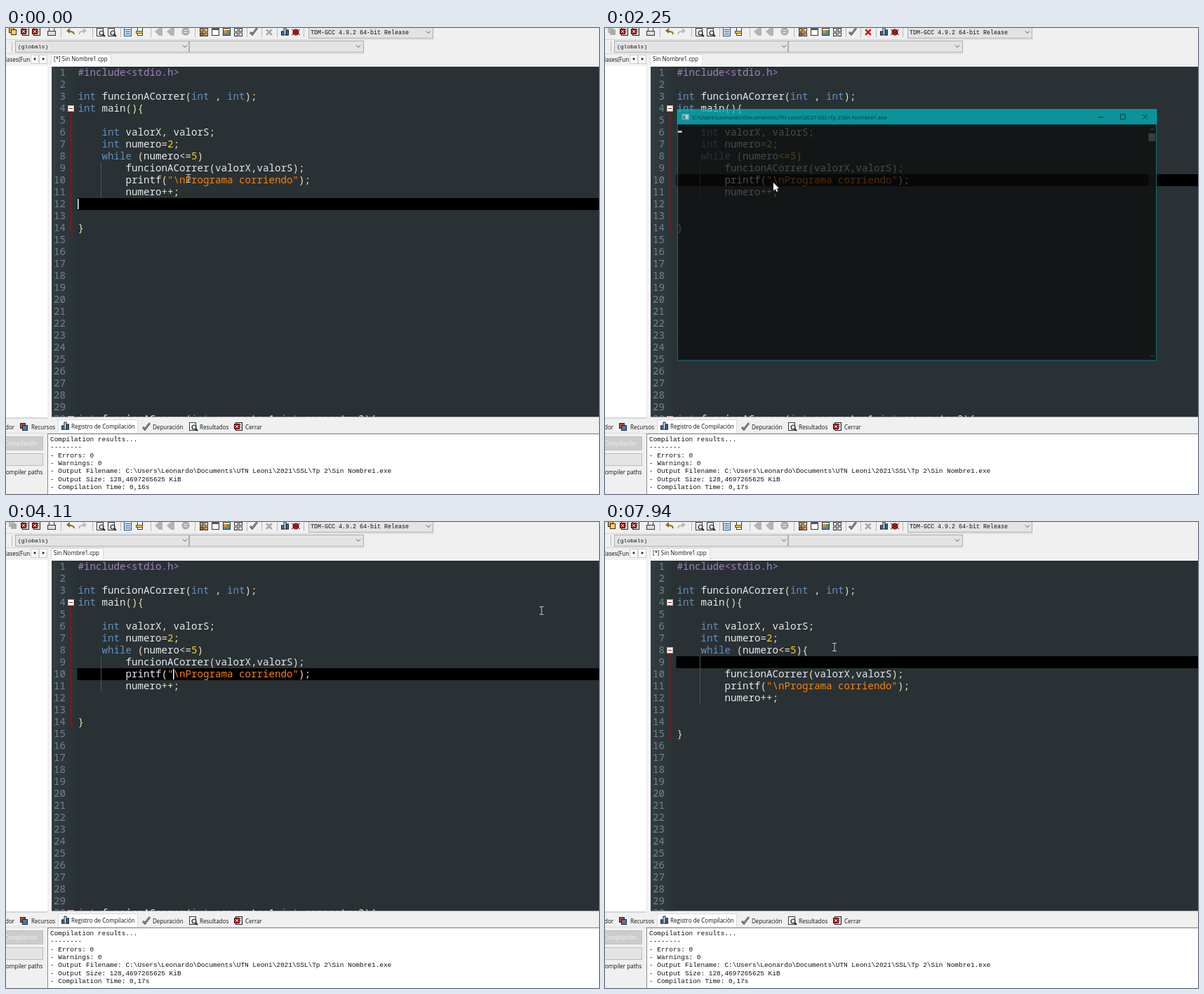
An HTML page with a canvas for the animation above (8 s loop, 845 by 663 pixels).

```html
<!DOCTYPE html>
<html lang="es">
<head>
<meta charset="utf-8">
<style>
html, body { margin: 0; width: 100%; height: 100%; overflow: hidden; background: #f0f0f0; }
canvas { display: block; }
</style>
</head>
<body>
<canvas id="stage" width="845" height="663"></canvas>
<script>
const c = document.getElementById('stage').getContext('2d');
const LOOP = 8000, X0 = 102.5, CW = 8.5, ROW = 17, TOP = 55, END = 553.5;
const UI = '8.05px "Open Sans", sans-serif';
const MONO = '"Liberation Mono", monospace';
const CODE = '14.17px "Noto Sans Mono", monospace';
const PATH = 'C:\\Users\\Leonardo\\Documents\\UTN Leoni\\2021\\SSL\\Tp 2\\Sin Nombre1.exe';

const HEAD = ['#include<stdio.h>', '', 'int funcionACorrer(int , int);', 'int main(){', '',
  '    int valorX, valorS;', '    int numero=2;'];
const BODY = ['        funcionACorrer(valorX,valorS);',
  '        printf("\\nPrograma corriendo");', '        numero++;', '', '', '}'];
const COLORS = ['#fb8007', '#a082bd', '#6390bd', '#ffcd22', '#e8e2b7', '#e8eaec'];
const TOKENS = /("[^"]*")|(#.*)|\b(int|while)\b|\b(\d+)|([^\w\s"]+)|(\w+|\s+)/g;

// Time, row, column, visible
const CARET = [[0, 12, 0, 1], [1090, 10, 16, 1], [2180, 10, 16, 0], [3970, 10, 16, 1],
  [4500, 8, 22, 1], [4800, 8, 22, 0], [5000, 8, 22, 1], [5200, 8, 21, 1], [5300, 8, 22, 1],
  [5730, 8, 22, 0], [5930, 9, 5, 1], [6210, 9, 5, 0], [6470, 9, 5, 1], [6670, 9, 5, 0],
  [6870, 10, 22, 1], [7070, 10, 22, 0], [7270, 9, 5, 1], [7470, 9, 5, 0],
  [7670, 9, 4, 1], [7940, 9, 4, 0]];
// Time, x, y
const MOUSE = [[0, 260, 214], [690, 260, 214], [1050, 241, 219], [2180, 240, 220], [2300, 240, 220],
  [2800, 261, 169], [3000, 261, 169], [3760, 752, 122], [3830, 766, 125], [4110, 764, 126],
  [4600, 331, 177], [4800, 327, 178], [LOOP, 327, 178]];

const clamp = v => Math.max(0, Math.min(1, v));
const rowTop = n => TOP + (n - 1) * ROW;

function box(x, y, w, h, fill, edge) {
  if (fill) { c.fillStyle = fill; c.fillRect(x, y, w, h); }
  if (edge) { c.strokeStyle = edge; c.lineWidth = 1; c.strokeRect(x + .5, y + .5, w - 1, h - 1); }
}
function text(s, x, y, font = UI, color = '#111') {
  c.font = font;
  c.fillStyle = color;
  c.fillText(s, x, y);
}
function line(color, width, ...p) {
  c.strokeStyle = color;
  c.lineWidth = width;
  c.beginPath();
  for (let i = 0; i < p.length; i += 2) c.lineTo(p[i], p[i + 1]);
  c.stroke();
}
function poly(fill, ...p) {
  c.fillStyle = fill;
  c.beginPath();
  for (let i = 0; i < p.length; i += 2) c.lineTo(p[i], p[i + 1]);
  c.fill();
}
function ring(x, y, r, color, fill) {
  c.beginPath();
  c.arc(x, y, r, 0, 7);
  if (fill) { c.fillStyle = fill; c.fill(); }
  c.strokeStyle = color;
  c.lineWidth = 1.2;
  c.stroke();
}

// Icons, placed by their centre
const cross = (x, y, r, color, w) => {
  line(color, w, x - r, y - r, x + r, y + r);
  line(color, w, x - r, y + r, x + r, y - r);
};
const tick = (x, y) => {
  line('#222', 2.6, x - 5, y + 1, x - 2, y + 4, x + 5, y - 5);
  line('#dfe8f5', 1, x - 5, y + 1, x - 2, y + 4, x + 5, y - 5);
};
const chart = (x, y) => [[-5, 6], [-1.5, 11], [2, 8]].forEach(([dx, h], i) =>
  box(x + dx, y + 5.5 - h, 4, h, ['#3a6ea5', '#d8e4f2', '#3a6ea5'][i], '#1a2530'));
const find = (x, y) => {
  box(x - 6, y - 6, 10, 12, '#fff', '#333');
  ring(x + 1, y + 1, 3, '#222', '#cfe2ee');
  line('#222', 2, x + 3, y + 3, x + 6, y + 6);
};
const closeDoc = (x, y) => {
  box(x - 4, y - 6, 10, 12, '#e4e4e4', '#222');
  line('#555', 1, x + 2, y - 2.5, x + 4, y - 2.5);
  line('#555', 1, x + 2, y + .5, x + 4, y + .5);
  box(x - 6, y - 4, 8, 8, '#b01818', '#5a0c0c');
  cross(x - 2, y, 1.8, '#fff', 1);
};
const grid = (x, y, colors) => colors.forEach((color, i) =>
  box(x - 6 + i % 2 * 6.5, y - 6 + (i >> 1) * 6.5, 5.5, 5.5, color, '#333'));
const stack = (x, y, a, b, edge) => {
  box(x - 6, y - 6, 8, 8, a, edge);
  box(x - 3, y - 3, 8, 8, b, edge);
};
const chevron = (x, y, color = '#555') => line(color, 1, x - 3, y - 1.5, x, y + 1.5, x + 3, y - 1.5);

function toolbar(saved, running) {
  box(0, 0, 845, 54, '#f0f0f0');
  line('#d4d4d4', 1, 0, 16.5, 610, 16.5);
  line('#d4d4d4', 1, 0, 36.5, 510, 36.5);
  for (const x of [78, 123, 163, 206, 269, 343, 364, 386, 424]) line('#b8b8b8', 1, x + .5, 0, x + .5, 13);
  if (saved) stack(10, 5, '#bdbdbd', '#a9a9a9', '#b0b0b0');
  else stack(10, 5, '#e5a83b', '#f5d36b', '#3b2a10');
  closeDoc(27, 5);
  closeDoc(43, 5);
  box(59, 4, 12, 7, '#ddd', '#333');
  box(61, -3, 8, 8, '#fff', '#333');
  line('#8a6d1c', 2, 97, 9, 96, 6, 89, 4);
  poly('#8a6d1c', 86, 4, 91, 0, 91, 8);
  line('#bbb', 2, 104, 9, 105, 6, 111, 4);
  poly('#bbb', 115, 4, 110, 0, 110, 8);
  find(135, 6);
  find(151, 6);
  box(168, -1, 11, 13, '#dbe9f8', '#24517c');
  for (const y of [2.5, 5.5, 8.5]) line('#24517c', 1, 170, y, 177, y);
  box(187, -1, 8, 12, '#fff', '#333');
  box(185, 4, 10, 4, '#f0c840', '#5d4a10');
  poly('#b4b4b4', 212, 5, 218, 0, 223, 0, 223, 11, 218, 11);
  poly('#b4b4b4', 229, 5, 235, 0, 240, 0, 240, 11, 235, 11);
  ring(256, 5, 5, '#aaa', '#aaa');
  box(253, 3, 6, 1, '#eee');
  box(253, 6, 6, 1, '#eee');
  grid(282, 6, ['#e6a23c', '#f6dc9c', '#b8542c', '#e6a23c']);
  box(293, 0, 11, 11, '#fff', '#333');
  box(293, 0, 11, 3, '#555');
  box(309, 0, 11, 11, '#fff', '#333');
  box(310, 3, 5, 4, '#e08a2c');
  box(315, 3, 4, 4, '#4d9b4a');
  box(310, 7, 9, 3, '#5a86c0');
  grid(331, 6, ['#fff', '#ddd', '#ddd', '#fff']);
  tick(353, 5);
  cross(375, 6, 3.8, running ? '#d90d0d' : '#a6a6a6', 2.6);
  chart(397, 5);
  ring(413, 6, 4, '#5a0d0d', '#c62020');
  line('#5a0d0d', 1, 407, 2, 419, 10);
  line('#5a0d0d', 1, 407, 10, 419, 2);
  box(431, -3, 178, 18, '#e3e3e3', '#adadad');
  text('TDM-GCC 4.9.2 64-bit Release', 434, 9, '8.33px ' + MONO);
  chevron(602, 6);
  line('#b8b8b8', 1, 8.5, 19, 8.5, 34);
  box(13, 18, 248, 17, '#e3e3e3', '#adadad');
  box(261, 18, 249, 17, '#e3e3e3', '#adadad');
  text('(globals)', 17, 29, '8px ' + MONO);
  chevron(255, 26);
  chevron(502, 26);

  text('lases(Fun', -1, 48);
  box(35, 38, 12, 13, '#fafafa', '#d0d0d0');
  box(47, 38, 12, 13, '#fafafa', '#d0d0d0');
  poly('#111', 39, 44, 42, 42, 42, 46);
  poly('#111', 55, 44, 52, 42, 52, 46);
  box(64, 37, saved ? 75 : 86, 18, '#fff', '#dcdcdc');
  text((saved ? '' : '[*] ') + 'Sin Nombre1.cpp', 68, 47);
  box(62, 53, 783, 2, '#fff');
}

function bottom(secs) {
  box(0, END, 845, 663 - END, '#f0f0f0');
  box(0, 554, 59, 2, '#d8d8d8');
  line('#dcdcdc', 1, 0, 576.5, 845, 576.5);
  box(74, 557, 114, 20, '#fff', '#dcdcdc');
  text('dor', -1, 571);
  stack(26, 568, '#c8442c', '#4a78b4', '#222');
  text('Recursos', 36, 571);
  chart(84, 566);
  text('Registro de Compilación', 93, 570);
  tick(200, 567);
  text('Depuración', 209, 571);
  find(267, 567);
  text('Resultados', 276, 571);
  closeDoc(331, 567);
  text('Cerrar', 341, 571);
  box(-2, 581, 55, 20, '#cccccc', '#bfbfbf');
  text('Compilación', -2, 594, UI, '#f4f4f4');
  box(-2, 605, 55, 18, '#e4e4e4', '#bcbcbc');
  text('ompiler paths', 0, 635);
  box(59, 577, 790, 90, '#fff', '#828790');
  ['Compilation results...', '--------', '- Errors: 0', '- Warnings: 0',
    '- Output Filename: ' + PATH, '- Output Size: 128,4697265625 KiB',
    '- Compilation Time: 0,' + secs + 's'
  ].forEach((s, i) => text(s, 63, 588 + i * 11.35, '9.43px ' + MONO));
}

function codeLine(s, row) {
  let col = 0;
  for (const m of s.matchAll(TOKENS)) {
    const kind = m.slice(1).findIndex(Boolean);
    text(m[0], X0 + col * CW, rowTop(row) + 13, CODE, COLORS[kind]);
    col += m[0].length;
  }
}
function fold(row) {
  const y = rowTop(row) + 4;
  box(88, y, 9, 9, '#fff', '#c9a0a0');
  box(90, y + 4, 5, 1, '#b00000');
}
function braceMark(s, row, col) {
  const x = X0 + col * CW;
  box(x, rowTop(row), CW, ROW, '#e8e2b7');
  text(s, x, rowTop(row) + 13, CODE, '#202020');
}

function editor(t) {
  const [, row, col, on] = CARET.findLast(k => k[0] <= t);
  const split = t >= 5400, removed = t >= 7670;
  const lines = [...HEAD, '    while (numero<=5)' + (t >= 5300 ? '{' : ''),
    ...(split ? [removed ? '' : '    }'] : []), ...BODY];
  if (!split) lines[29] = 'int funcionACorrer(int parametro1,int parametro2){';

  box(0, 54, 60, 500, '#fff');
  box(59, 54, 3, 500, '#f0f0f0');
  box(62, 54, 3, 500, '#fff');
  c.save();
  c.beginPath();
  c.rect(65, TOP, 780, END - TOP);
  c.clip();
  box(65, TOP, 780, 500, '#293134');
  const g = c.createLinearGradient(65, 0, 101, 0);
  g.addColorStop(0, '#323d41');
  g.addColorStop(1, '#293134');
  box(65, TOP, 36, 500, g);
  box(101.5, rowTop(row), 744, ROW, '#000');
  c.textAlign = 'right';
  for (let n = 1; n <= 30; n++) text(n, 85, rowTop(n) + 13, CODE, '#71868b');
  c.textAlign = 'left';

  const end = rowTop(split ? 15 : 14) + 12.5;
  line('#a80a0a', 1.4, 92.5, removed ? 187 : 119, 92.5, end, 96, end);
  fold(4);
  if (split) fold(8);
  else fold(30);
  const first = split && !removed ? 10 : 9;
  line('#4a5558', 1, 135.5, rowTop(first), 135.5, rowTop(split ? 13 : 12));

  tooltip(t);
  lines.forEach((s, i) => codeLine(s, i + 1));
  if (split && !removed && row < 10) {
    braceMark('{', 8, 21);
    braceMark('}', 9, 4);
  }
  if (on) box(X0 + col * CW - .5, rowTop(row) + 1, 1.5, 15, '#fff');
  c.restore();
}

function tooltip(t) {
  if (t < 1300 || t >= 1510) return;
  c.save();
  c.globalAlpha = clamp((t - 1300) / 180);
  box(173, 228, 333, 15, '#15191a');
  box(171, 226, 332, 15, '#c4c4b8', '#777');
  const font = '8.24px "DejaVu Sans Mono", monospace';
  text('decl printf ', 243, 236, font, '#1c2a1c');
  text('(const char * __restrict__ _Format, ...)', 302, 236, font, '#6a1010');
  c.restore();
}

function consoleWindow(t) {
  const open = clamp((t - 2110) / 195), shut = clamp((t - 3830) / 200);
  const a = open * (1 - shut);
  if (!a) return;
  const s = .95 + .05 * a;
  c.save();
  c.globalAlpha = a;
  c.translate(444.5, 294.5);
  c.scale(s, s);
  c.translate(-444.5, -294.5);
  box(98, 135, 693, 341, '#0c0c0c');
  box(779, 135, 11, 340, '#171717');
  box(98, 113, 693, 363, null, '#12a5b0');
  box(98, 113, 693, 22, '#00b7c3');
  box(105, 120, 10, 8, '#d9f2f5', '#5d8f94');
  box(106, 122, 4, 5, '#2b6f76');
  text(PATH, 120, 127.5, UI, '#02181a');
  if (t >= 3800) box(758, 114, 32, 21, '#e81123');
  box(706, 124, 8, 1, '#02181a');
  box(738, 120, 8, 8, null, '#02181a');
  cross(774, 124, 3.3, t >= 3800 ? '#fff' : '#02181a', 1);
  line('#0f8c95', 1, 781.5, 143.5, 784.5, 140.5, 787.5, 143.5);
  chevron(784.5, 469, '#0f8c95');
  box(779, 148, 10, 11, '#4d4d4d');
  if (t < 3200 || Math.floor(t / 200) % 2) box(99, 144, 6, 3, '#fff');
  c.restore();
}

function pointer(t) {
  const i = MOUSE.findIndex(k => k[0] > t), a = MOUSE[i - 1], b = MOUSE[i];
  const f = (t - a[0]) / (b[0] - a[0]);
  const x = a[1] + (b[1] - a[1]) * f, y = a[2] + (b[2] - a[2]) * f;
  c.save();
  c.translate(x, y);
  if (t >= 2180 && t < 3980) {
    const shape = [0, 0, 0, 11.5, 2.6, 9, 4.6, 13, 6.4, 12, 4.5, 8.2, 8, 8.2];
    line('#222', 1, ...shape, 0, 0);
    poly('#fff', ...shape);
  } else {
    line('#c8cccd', 1, 0, -5, 0, 5);
    for (const d of [-5.5, 5.5]) line('#c8cccd', 1, -3, d, 3, d);
  }
  c.restore();
}

function draw(t) {
  editor(t);
  toolbar(t >= 1510 && t < 5200, t >= 2040 && t < 3970);
  bottom(t < 2040 ? 16 : 17);
  consoleWindow(t);
  pointer(t);
}

const start = performance.now();
function nextFrame() {
  draw((performance.now() - start) % LOOP);
  requestAnimationFrame(nextFrame);
}
nextFrame();
</script>
</body>
</html>
```
